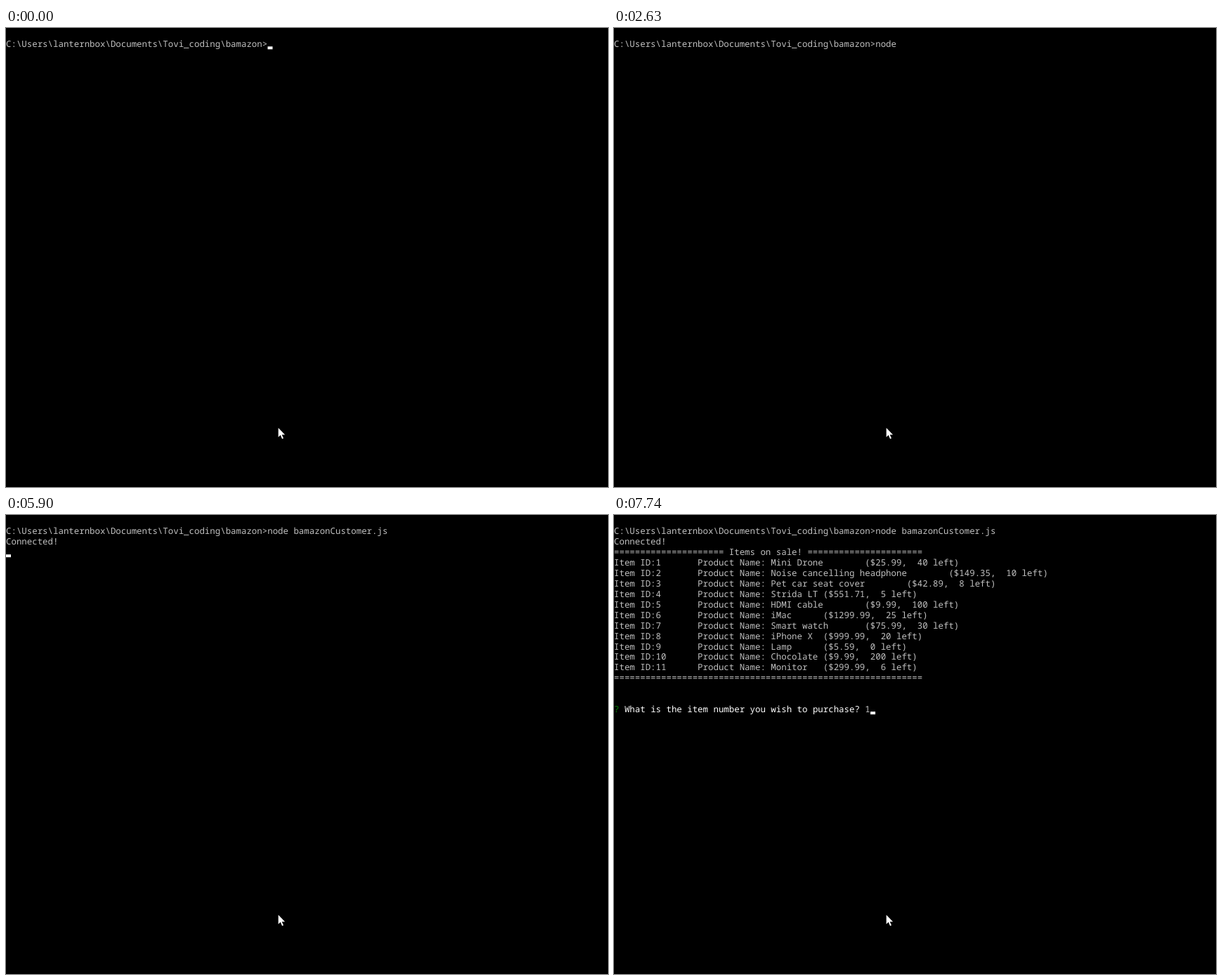
These frames come from a looping animation (857 by 654 pixels, 8 s). An HTML page:

```html
<!DOCTYPE html>
<html lang="en">
<head>
<meta charset="utf-8">
<title>Terminal session</title>
<style>
  html, body { margin: 0; width: 100%; height: 100%; overflow: hidden; background: #000; }
  #screen {
    position: absolute; left: 0; top: 16.2px; margin: 0;
    font: 500 12.417px/14.93px "Noto Sans Mono", "DejaVu Sans Mono", monospace;
    text-rendering: geometricPrecision; font-variant-ligatures: none;
    tab-size: 8; white-space: pre; color: #c0c0c0;
  }
  #screen .mark { color: #008000; }
  #screen .ask { color: #fff; }
  #caret { position: absolute; left: 0; top: 0; width: 7.45px; height: 3.73px; background: #fff; }
  #mouse { position: absolute; left: 387px; top: 569px; }
</style>
</head>
<body>
<pre id="screen"></pre>
<div id="caret"></div>
<svg id="mouse" width="12" height="18"><path fill="#fff" d="M.7 .7V14L3.7 11.1L6.1 16.4L8 15.6L5.7 10.6H10.1Z"/></svg>
<script>
const LOOP = 8000, CELL_W = 7.45, CELL_H = 14.93;
const prompt = "C:\\Users\\lanternbox\\Documents\\Tovi_coding\\bamazon>";
const command = "node bamazonCustomer.js";
const question = "What is the item number you wish to purchase? ";

const items = [
  ["Mini Drone", "25.99", 40],
  ["Noise cancelling headphone", "149.35", 10],
  ["Pet car seat cover", "42.89", 8],
  ["Strida LT", "551.71", 5],
  ["HDMI cable", "9.99", 100],
  ["iMac", "1299.99", 25],
  ["Smart watch", "75.99", 30],
  ["iPhone X", "999.99", 20],
  ["Lamp", "5.59", 0],
  ["Chocolate", "9.99", 200],
  ["Monitor", "299.99", 6]
];
const bar = n => "=".repeat(n);
const listing = [
  bar(21) + " Items on sale! " + bar(22),
  ...items.map(([name, price, left], i) =>
    `Item ID:${i + 1}\tProduct Name: ${name}\t($${price},  ${left} left)`),
  bar(59), "", "", ""
].join("\n");
const ask = `<span class="mark">?</span> <span class="ask">${question}</span>`;

// Output after the command, with the caret's row and column.
const typing = { text: "", row: 1 };
const entered = { text: "", row: 2, col: 0 };
const connected = { text: "\nConnected!", row: 3, col: 0 };
const full = "\nConnected!\n" + listing;
const asking = { text: full + ask, row: 18, col: 48 };
const redraw = { text: full, row: 18, col: 0 };
const answered = { text: full + ask + "1", row: 18, col: 49 };

// Time in ms, typed characters, output, caret visible.
const steps = [
  [0, 0, typing, true],
  [230, 0, typing, false],
  [760, 0, typing, true],
  [860, 1, typing, true],
  [1030, 2, typing, true],
  [1260, 3, typing, true],
  [1290, 3, typing, false],
  [1460, 4, typing, true],
  [1820, 4, typing, false],
  [2030, 5, typing, true],
  [2350, 5, typing, false],
  [2880, 5, typing, true],
  [3100, 6, typing, true],
  [3410, 6, typing, false],
  [3600, 7, typing, true],
  [3940, 7, typing, false],
  [4130, 23, typing, true],
  [4970, 23, entered, true],
  [5040, 23, entered, false],
  [5570, 23, entered, true],
  [5900, 23, connected, true],
  [5940, 23, asking, true],
  [6100, 23, asking, false],
  [6600, 23, asking, true],
  [7140, 23, asking, false],
  [7670, 23, asking, true],
  [7700, 23, redraw, true],
  [7740, 23, answered, true]
];

const screen = document.getElementById("screen");
const caret = document.getElementById("caret");
let current;

function show(step) {
  const [, typed, out, visible] = step;
  const col = out.col ?? prompt.length + typed;
  screen.innerHTML = prompt.replace(">", "&gt;") + command.slice(0, typed) + out.text;
  caret.style.transform = `translate(${col * CELL_W}px, ${out.row * CELL_H + 11.4}px)`;
  caret.style.visibility = visible ? "visible" : "hidden";
}

function tick() {
  const t = performance.now() % LOOP;
  const step = steps.findLast(s => s[0] <= t);
  if (step !== current) show(current = step);
  requestAnimationFrame(tick);
}
tick();
</script>
</body>
</html>
```
